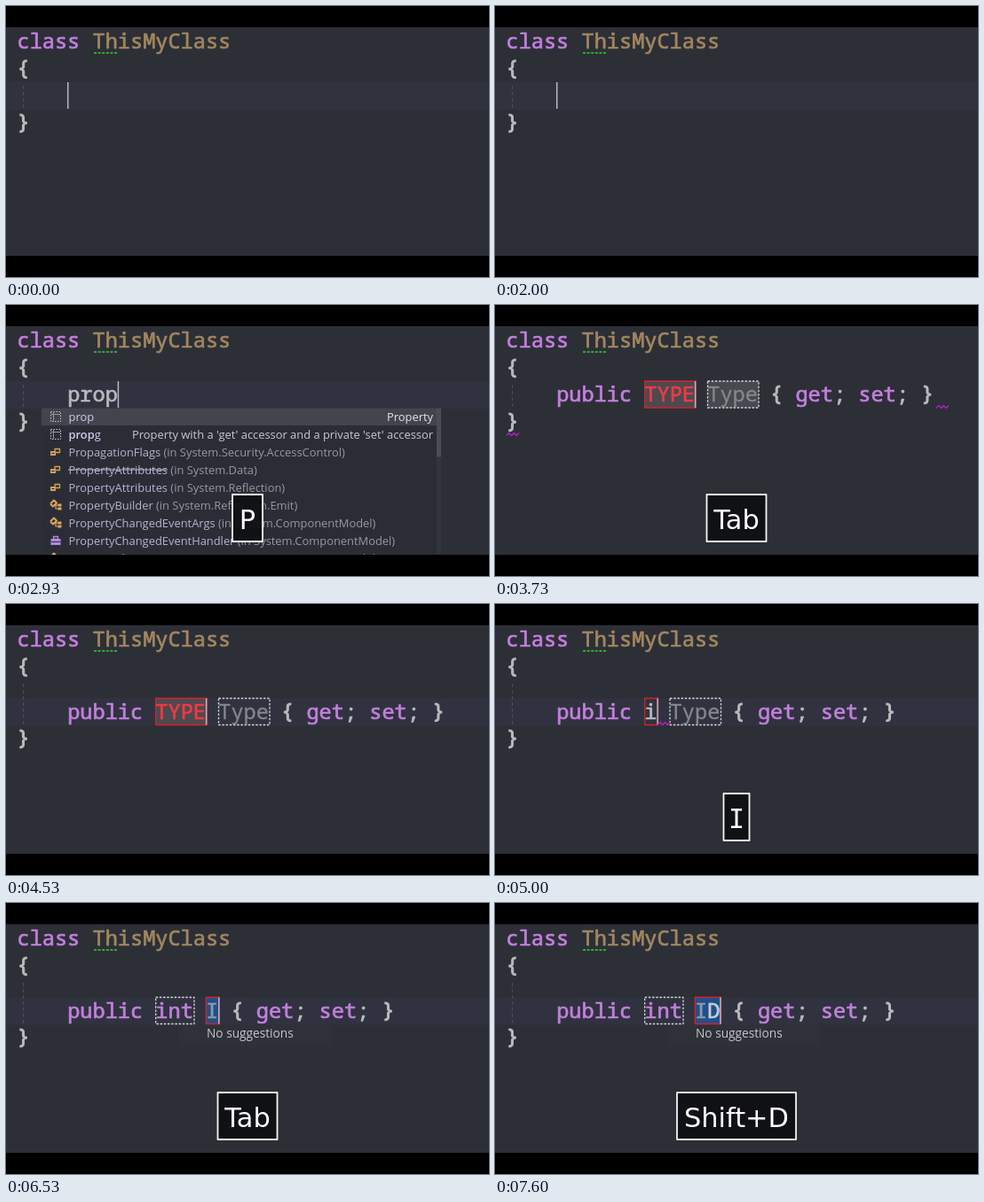
Animation of 544x306 px, one loop 7.79 s. Source, as an HTML page with a canvas:

```html
<!DOCTYPE html>
<html>
<head>
<meta charset="utf-8">
<style>
html, body { margin: 0; width: 100%; height: 100%; overflow: hidden; background: #000; }
canvas { display: block; }
</style>
</head>
<body>
<canvas id="stage" width="544" height="306"></canvas>
<script>
const ctx = document.getElementById('stage').getContext('2d');
const LOOP = 7790, LEFT = 12.5, CHAR = 14.17;
const CODE = '23.6px "Noto Sans Mono", monospace';
const UI = '12.9px "Open Sans", sans-serif';
const PURPLE = '#c47fdf', GOLD = '#a1875f', PLAIN = '#b9babd', DIM = '#85878b', RED = '#f03a42';
const col = n => LEFT + n * CHAR;

// Each entry holds from its time until the next one.
const TYPED = [[0, ''], [2130, 'p'], [2400, 'pr'], [2600, 'pro'], [2800, 'prop']];
const TYPES = [[0, 'TYPE'], [4870, 'i'], [5130, 'in'], [5470, 'int']];
const NAMES = [[0, 'Type'], [6400, 'I'], [7130, 'ID']];
const KEYS = [[0, ''], [2130, 'P'], [2400, 'R'], [2600, 'O'], [2800, 'P'], [3330, 'Tab'], [4500, ''],
  [4870, 'I'], [5130, 'N'], [5470, 'T'], [5800, 'Tab'], [6870, 'Shift+I'], [7130, 'Shift+D']];
const at = (track, t) => track.filter(e => e[0] <= t).pop()[1];

const PROPS = {
  x: 40, y: 116.5, w: 450, rows: [
    ['snippet', 'prop', '', 'Property'],
    ['snippet', 'propg', '', "Property with a 'get' accessor and a private 'set' accessor"],
    ['enum', 'PropagationFlags', 'System.Security.AccessControl'],
    ['enum', 'PropertyAttributes', 'System.Data'],
    ['enum', 'PropertyAttributes', 'System.Reflection'],
    ['class', 'PropertyBuilder', 'System.Reflection.Emit'],
    ['class', 'PropertyChangedEventArgs', 'System.ComponentModel'],
    ['delegate', 'PropertyChangedEventHandler', 'System.ComponentModel'],
    ['class', 'PropertyChangingEventArgs', 'System.ComponentModel']], struck: 3
};
const INTS = {
  x: 139, y: 137.5, w: 289, rows: [
    ['key', 'int'], ['key', 'interface'], ['key', 'internal'],
    ['struct', 'Int16'], ['struct', 'Int32'], ['struct', 'Int64'], ['struct', 'IntPtr'],
    ['class', 'InvalidTimeZoneException']]
};

function rect(x, y, w, h, color) {
  ctx.fillStyle = color;
  ctx.fillRect(x, y, w, h);
}

function frame(x, y, w, h, color, dash = [], width = 1.3) {
  ctx.strokeStyle = color;
  ctx.lineWidth = width;
  ctx.setLineDash(dash);
  ctx.strokeRect(x, y, w, h);
  ctx.setLineDash([]);
}

function path(points, color, width = 1.2, dash = []) {
  ctx.beginPath();
  points.forEach(p => ctx.lineTo(...p));
  ctx.strokeStyle = color;
  ctx.lineWidth = width;
  ctx.setLineDash(dash);
  ctx.stroke();
  ctx.setLineDash([]);
}

function write(str, x, y, color, font = UI, align = 'left') {
  ctx.font = font;
  ctx.textAlign = align;
  ctx.fillStyle = color;
  ctx.fillText(str, x, y);
  return x + ctx.measureText(str).width;
}

// Code text gets a thin outline for a medium weight.
function code(str, n, y, color, weight = 0.7) {
  write(str, col(n), y, color, CODE);
  ctx.strokeStyle = color;
  ctx.lineWidth = weight;
  ctx.lineJoin = 'round';
  ctx.strokeText(str, col(n), y);
}

const brace = (str, n, y) => code(str, n, y - 1, PLAIN, 1);

function squiggle(x, y) {
  path([0, 1, 2, 3, 4, 5].map(i => [x + i * 2.8, y + (i % 2 ? -1.5 : 1.5)]), '#b01fc0', 1.3);
}

const icons = {
  snippet() {
    frame(-5.5, -5.5, 11, 11, '#c4c4c6', [1.5, 1.5], 1);
    path([[-5, -2.5], [5, -2.5]], '#96969a', 1);
    path([[-2.5, -5], [-2.5, 5]], '#96969a', 1);
  },
  enum() {
    frame(-1, -3.5, 5.5, 4, '#d0a25a');
    rect(-6, -1, 6, 5, '#d0a25a');
    rect(-4.5, 1, 3, 1, '#2d2f37');
  },
  class() {
    path([[-6, -1.5], [-2, -5.5], [1, -2.5], [-3, 1.5], [-6, -1.5]], '#d9a65c', 2);
    path([[-1, 0], [3, 0]], '#d9a65c');
    path([[0, 0], [0, 4], [3, 4]], '#d9a65c');
    rect(2.5, -1.5, 4, 3, '#d9a65c');
    rect(2.5, 2.5, 4, 3, '#d9a65c');
  },
  delegate() {
    rect(-5.5, -2, 11, 7, '#b08ae0');
    frame(-2.5, -4.5, 5, 3, '#b08ae0');
    rect(-5, 1, 10, 1, '#2d2f37');
  },
  struct() {
    rect(-5.5, -4.5, 5, 5, '#69a9e8');
    rect(0.5, 0, 5, 5, '#69a9e8');
    path([[1, -3.5], [4.5, -3.5], [4.5, -1]], '#69a9e8', 2);
    path([[-4.5, 1.5], [-4.5, 4], [-1, 4]], '#69a9e8', 2);
  },
  key() {
    ctx.beginPath();
    ctx.arc(0, 0, 7.5, 0, 7);
    ctx.fillStyle = '#c9c9cb';
    ctx.fill();
    ctx.beginPath();
    ctx.arc(-2.5, 0, 2.2, 0, 7);
    ctx.strokeStyle = '#2d2f37';
    ctx.lineWidth = 2;
    ctx.stroke();
    path([[-0.5, 0], [5, 0], [5, 2]], '#2d2f37', 2);
  }
};

function list({ x, y, w, rows, struck }, prefix) {
  rect(x, y, w, 170, '#2b2d36');
  rect(x, y, w - 5, 19.5, '#43444c');
  rect(x + w - 5, y, 5, 170, '#32343c');
  rect(x + w - 5, y, 5, 55, '#4b4d54');
  rows.forEach(([icon, name, space, hint], i) => {
    const mid = y + 9.5 + i * 20, base = mid + 4.5;
    ctx.save();
    ctx.translate(x + 16, mid);
    icons[icon]();
    ctx.restore();
    const bold = name.startsWith(prefix) ? prefix : '';
    const color = bold ? '#d2caf0' : '#b6b3d0';
    let end = write(bold, x + 30.5, base, color, (i ? '600 ' : '') + UI);
    end = write(name.slice(bold.length), end, base, color);
    if (i === struck) path([[x + 30, mid], [end, mid]], color, 1);
    if (space) write(` (in ${space})`, end, base, '#97989e');
    if (hint) write(hint, x + w - 9, base, i ? '#c8c8ce' : '#e6e6e8', UI, 'right');
  });
}

function keycap(label) {
  const font = '30.4px "DejaVu Sans", sans-serif';
  ctx.font = font;
  const serif = label === 'I';
  const w = serif ? 29 : Math.round(ctx.measureText(label).width) + 16;
  rect(272 - w / 2, 214, w, 53, 'rgba(14, 15, 18, 0.92)');
  frame(272 - w / 2, 214, w, 53, '#f4f4f4', [], 1.8);
  write(label, 272, 253, '#fff', serif ? '30px "DejaVu Sans Mono", monospace' : font, 'center');
}

function caret(n, y, alpha = 1) {
  ctx.globalAlpha = alpha;
  rect(col(n) - 0.2, y, 1.5, 30, '#b4b8c2');
  ctx.globalAlpha = 1;
}

function blink(t) {
  if (t < 270) return 1;
  if (t < 400) return 0.5;
  if (t < 930) return 0;
  if (t < 1400) return 1;
  return t < 1470 ? 0.5 : t < 2000 ? 0 : 1;
}

function property(t, base) {
  const type = at(TYPES, t), name = at(NAMES, t);
  const top = base - 23, naming = t >= 6000, fresh = t < 4870;
  const nameCol = 12 + type.length, restCol = nameCol + name.length;
  // Accessors lose their keyword colour while the type is incomplete.
  const accessor = t >= 5130 && t < 5870 ? PLAIN : PURPLE;
  const box = (n, len, fill, active) => {
    const x = col(n) + 0.3, w = len * CHAR + 0.8;
    if (fill) rect(x, top, w, 30, fill);
    frame(x, top, w, 30, active ? '#d8202c' : '#d6d6d8', active ? [] : [2.5, 1.7]);
  };
  box(11, type.length, fresh ? '#4b4a50' : '', !naming);
  box(nameCol, name.length, naming ? '#20508a' : base < 120 ? '#474950' : '', naming);
  code('public', 4, base, PURPLE);
  code(type, 11, base, fresh ? RED : type === 'i' ? PLAIN : PURPLE);
  if (naming && name !== 'Type') {
    code('I', nameCol, base, '#8b99a8');
    code(name.slice(1), nameCol + 1, base, '#c3ccd6');
  } else code(name, nameCol, base, naming ? '#a5aebb' : DIM, 0.3);
  brace('{', restCol + 1, base);
  code('get', restCol + 3, base, accessor);
  code(';', restCol + 6, base, PLAIN);
  code('set', restCol + 8, base, accessor);
  code(';', restCol + 11, base, PLAIN);
  brace('}', restCol + 13, base);
  caret(naming ? restCol : 11 + type.length, top);
  if (!fresh && !naming) squiggle(col(11 + type.length) + 0.5, base + 5.5);
}

function draw(t) {
  const snippet = t >= 3600, lowered = t >= 3800;
  const base = lowered ? 129.5 : 109;
  rect(0, 0, 544, 306, '#000');
  ctx.save();
  ctx.beginPath();
  ctx.rect(0, 24, 544, 258);
  ctx.clip();
  rect(0, 24, 544, 258, '#2d2f37');
  if (!snippet || lowered) rect(0, base - 23, 544, 31, '#30333f');
  path([[19.5, 90], [19.5, base + 7]], '#4d4f55', 1, [4, 3]);
  code('class', 0, 48, PURPLE);
  code('ThisMyClass', 6, 48, GOLD);
  path([[99, 53], [125, 53]], '#2fd32f', 1.6, [3, 1.6]);
  brace('{', 0, 78.5);
  brace('}', 0, base + 30.5);

  if (snippet) {
    property(t, base);
    if (!lowered) {
      squiggle(497, 115);
      squiggle(13, 146);
    }
  } else {
    const typed = at(TYPED, t);
    code(typed, 4, base, PLAIN);
    caret(4 + typed.length, 86, blink(t));
  }

  if (t >= 2270 && t < 3400) list(PROPS, at(TYPED, t));
  if (t >= 5070 && t < 5870) list(INTS, at(TYPES, t));
  if (t >= 6400) {
    rect(194, 138, 172, 24, '#2f3139');
    write('No suggestions', 226, 151.5, '#c6c7cc', '13.7px "Open Sans", sans-serif');
  }
  const key = at(KEYS, t);
  if (key) keycap(key);
  ctx.restore();
}

function tick() {
  draw(performance.now() % LOOP);
  requestAnimationFrame(tick);
}
tick();
</script>
</body>
</html>
```
